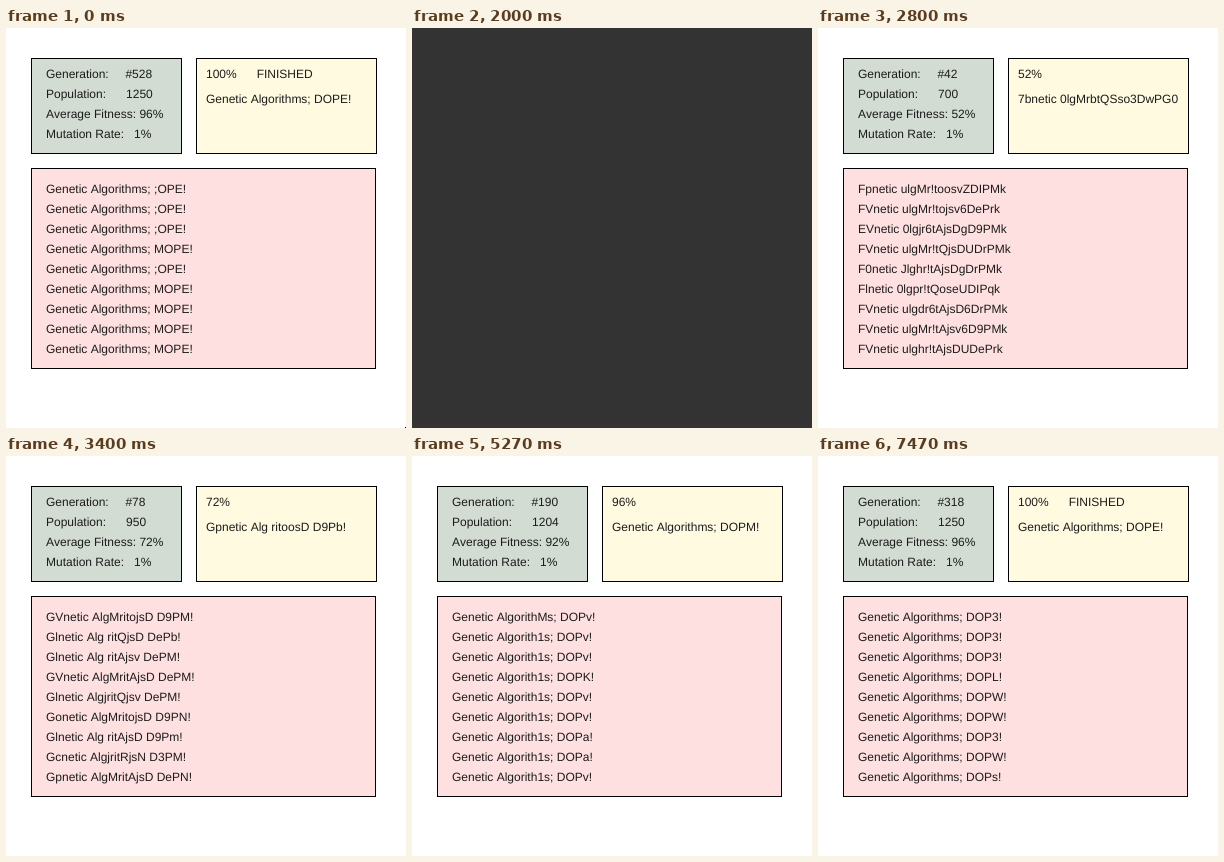
Animation, 400 px wide and 400 px high, one loop 8000 ms. Source, as an HTML page:

```html
<!DOCTYPE html>
<html lang="en">
<head>
<meta charset="utf-8">
<title>Genetic algorithm</title>
<style>
  html, body { margin: 0; width: 100%; height: 100%; overflow: hidden; background: #fff; }
  svg { display: block; width: 400px; height: 400px; }
  text { font: 12px "Liberation Sans", Arial, sans-serif; font-kerning: none; white-space: pre; fill: #1c1c1c; text-rendering: geometricPrecision; }
  .box { stroke: #000; stroke-width: 1; }
</style>
</head>
<body>
<svg viewBox="0 0 400 400">
  <rect class="box" x="25.5" y="30.5" width="150" height="95" fill="#d2dcd2"/>
  <rect class="box" x="190.5" y="30.5" width="180" height="95" fill="#fffae0"/>
  <rect class="box" x="25.5" y="140.5" width="344" height="200" fill="#ffe0e0"/>
  <g id="labels"></g>
  <path id="cursor" d="M0 0V16L3.7 12.5L6.2 18.3L8.6 17.3L6.1 11.6H11.4Z" fill="#fff" stroke="#000"/>
  <g id="blank">
    <rect width="400" height="400" fill="#333"/>
    <rect y="397.5" width="400" height="2.5" fill="#3a3137"/>
  </g>
</svg>
<script>
const LOOP = 8000, STEP = 200 / 3;
const GOAL = "Genetic Algorithms; DOPE!";
const CHARS = "ABCDEFGHIJKLMNOPQRSTUVWXYZabcdefghijklmnopqrstuvwxyz0123456789 !;";
const ROWS = 9;
const START = 32, END = 112;

const rnd = (a, b, c) => {
  const v = Math.sin(a * 12.9898 + b * 78.233 + c * 37.719 + 1.7) * 43758.5453;
  return v - Math.floor(v);
};
const score = s => 4 * [...s].filter((c, i) => c === GOAL[i]).length;

// Fill the ? slots of a pattern, one string per word of variants.
const fill = (pattern, variants) => variants.split(" ").map(v => {
  let i = 0;
  return pattern.replace(/\?/g, () => v[i++]);
});
const noise = row => [...GOAL].map((_, i) => CHARS[Math.floor(rnd(i, row, 5) * CHARS.length)]).join("");

// A stage of the population: step, then nine members followed by the best one.
const stage = (at, list) => ({ at, pool: list.slice(0, ROWS), best: list[ROWS] });
const stages = [
  stage(START - 1, Array.from({ length: ROWS + 1 }, (_, r) => noise(r))),
  stage(42, [
    "Fpnetic ulgMr!toosvZDIPMk", "FVnetic ulgMr!tojsv6DePrk", "EVnetic 0lgjr6tAjsDgD9PMk",
    "FVnetic ulgMr!tQjsDUDrPMk", "F0netic Jlghr!tAjsDgDrPMk", "Flnetic 0lgpr!tQoseUDIPqk",
    "FVnetic ulgdr6tAjsD6DrPMk", "FVnetic ulgMr!tAjsv6D9PMk", "FVnetic ulghr!tAjsDUDePrk",
    "7bnetic 0lgMrbtQSso3DwPG0"]),
  stage(51, [
    "GVnetic AlgMritojsD D9PM!", "Glnetic Alg ritQjsD DePb!", "Glnetic Alg ritAjsv DePM!",
    "GVnetic AlgMritAjsD DePM!", "Glnetic AlgjritQjsv DePM!", "Gonetic AlgMritojsD D9PN!",
    "Glnetic Alg ritAjsD D9Pm!", "Gcnetic AlgjritRjsN D3PM!", "Gpnetic AlgMritAjsD DePN!",
    "Gpnetic Alg ritoosD D9Pb!"]),
  stage(65, fill("G?netic Algorith?s; DOP?!", "ljM l1M lGM 7GM 7jM 21M lGM 71M ljG lUM")),
  stage(79, fill("Genetic Algorith?s; DOP?!", "Mv 1v 1v 1K 1v 1v 1a 1a 1v mM")),
  stage(END, fill("Genetic Algorithms; DOP?!", "3 3 3 L W W 3 W s E"))
];
const finished = stage(0, fill("Genetic Algorithms; ?OPE!", "; ; ; M ; M M M M D"));

// Between stages each letter position converges at its own moment.
function evolve(n) {
  if (n >= END) return stages[stages.length - 1];
  const k = stages.findIndex(s => s.at > n) - 1;
  const a = stages[k], b = stages[k + 1];
  if (n === a.at) return a;
  const last = b.at === END;
  const u = (n - a.at) / (b.at - a.at) * (last ? 3 : 1);
  const from = [...GOAL].map((_, i) => rnd(i, k, 11) < u ? b : a);
  const pool = a.pool.map((_, r) =>
    from.map((s, i) => s.pool[Math.floor(rnd(i, r, n) * ROWS)][i]).join(""));
  const best = last ? a.best : from.map((s, i) => s.best[i]).join("");
  return { pool, best };
}

const el = id => document.getElementById(id);
const label = (x, y) => {
  const t = document.createElementNS("http://www.w3.org/2000/svg", "text");
  t.setAttribute("x", x);
  t.setAttribute("y", y);
  return el("labels").appendChild(t);
};
const stats = [50, 70, 90, 110].map(y => label(40, y));
const percent = label(200, 50), bestText = label(200, 75);
const members = Array.from({ length: ROWS }, (_, r) => label(40, 165 + 20 * r));

function show({ pool, best }, gen) {
  const top = score(best), avg = score(pool[0]);
  const size = gen < 186 ? 50 + 12.5 * avg : Math.min(1250, 1200 + gen - 186);
  stats[0].textContent = "Generation:     #" + gen;
  stats[1].textContent = "Population:      " + size;
  stats[2].textContent = "Average Fitness: " + avg + "%";
  stats[3].textContent = "Mutation Rate:   1%";
  percent.textContent = top + "%" + (top === 100 ? "      FINISHED" : "");
  bestText.textContent = best;
  members.forEach((m, r) => m.textContent = pool[r]);
}

function moveCursor(n) {
  const p = Math.max(0, (n - 5) / 6);
  const x = 399.5 - 276 * p, y = 399 - 16.5 * Math.sin(Math.PI * p);
  el("cursor").setAttribute("transform", `translate(${x} ${y})`);
  el("cursor").style.display = n < 11 ? "" : "none";
}

function draw(n) {
  moveCursor(n);
  el("blank").style.display = n >= 30 && n < START ? "" : "none";
  if (n < START) show(finished, 528);
  else show(evolve(n), n >= END ? 318 : Math.min(317, 4 * n - 126));
}

let shown = -1;
function tick() {
  const n = Math.floor((performance.now() % LOOP + 3.4) / STEP) % 120;
  if (n !== shown) draw(shown = n);
  requestAnimationFrame(tick);
}
tick();
</script>
</body>
</html>
```
